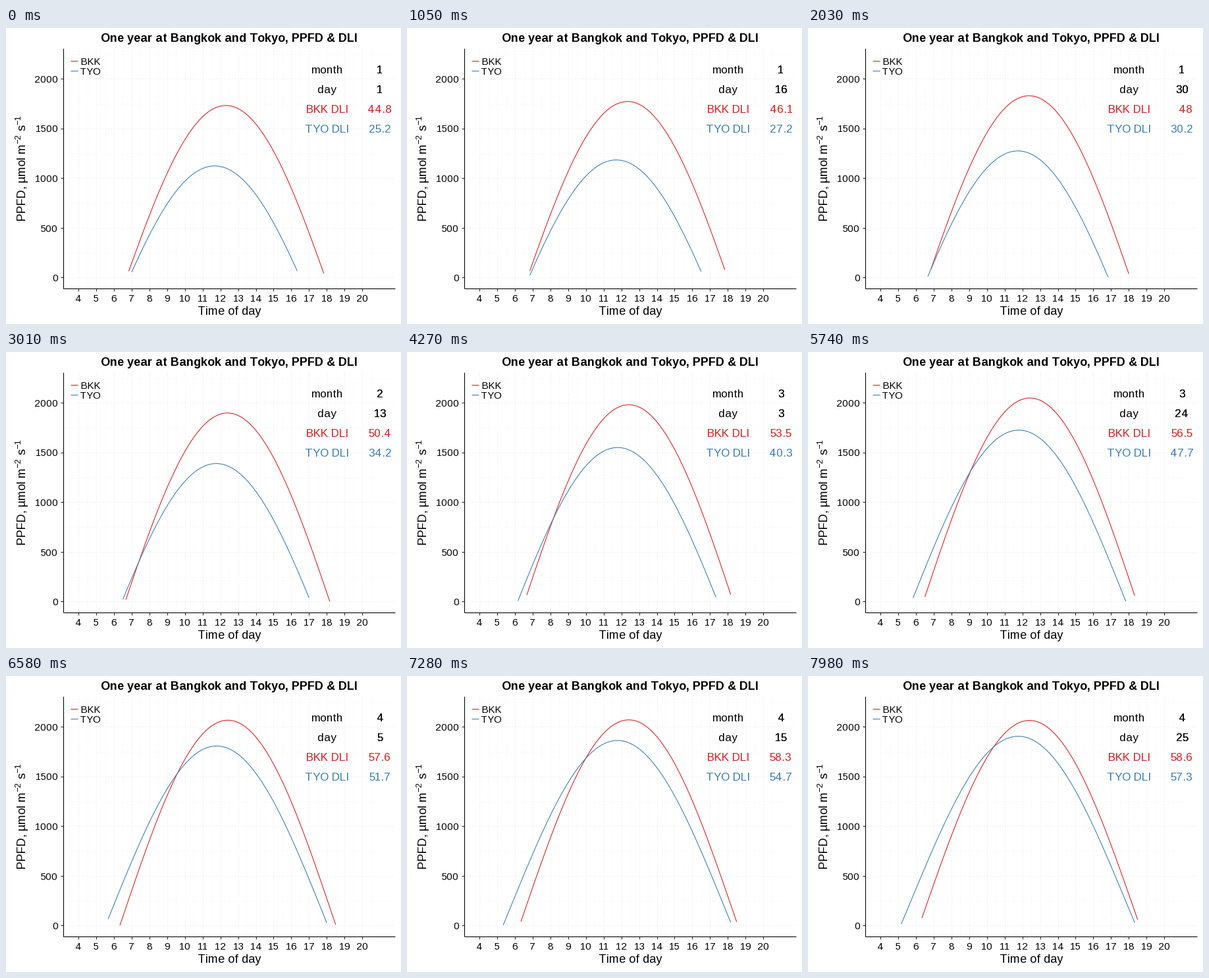
Recreate the animation shown at these times as a matplotlib script. Size 600x450 px, loop 8000 ms.

```python
import numpy as np
import matplotlib.pyplot as plt
from matplotlib.animation import FuncAnimation
from matplotlib.collections import LineCollection

W, H, DPI = 600, 450, 100
PX = 72 / DPI                      # points per pixel
RED, BLUE = "#E41A1C", "#377EB8"
LOOP, STEP, DAY_MS = 8000, 20, 70
MONTHS = (31, 28, 31, 30, 31)
TICK, CELL, TITLE = 15.43, 17.15, 18   # text sizes in pixels

# whole-pixel glyph advances
plt.rcParams.update({
    "font.family": "Liberation Sans",
    "mathtext.default": "regular",
    "text.hinting": "force_autohint",
    "text.hinting_factor": 1,
    "toolbar": "None",
})

# name, colour, latitude, mean solar noon in local hours
CITIES = (("BKK", RED, 13.75, 12.308), ("TYO", BLUE, 35.68, 11.676))
HOURS = np.arange(24 * 6 + 1) / 6


def px_x(hour):
    return 110.2 + 26.93 * (np.asarray(hour) - 4)


def px_y(ppfd):
    return 379.3 - 0.151 * np.asarray(ppfd)


def sun_terms(day, lat):
    """Irradiance scale and the constant and swinging parts of cos(zenith)."""
    n = day + 1
    scale = 2092.4 * (1 + 0.033 * np.cos(2 * np.pi * n / 365))
    dec = np.radians(23.45 * np.sin(2 * np.pi * (n + 284.12) / 365))
    phi = np.radians(lat)
    return scale, np.sin(phi) * np.sin(dec), np.cos(phi) * np.cos(dec)


def curve(day, lat, noon):
    scale, base, swing = sun_terms(day, lat)
    noon = noon + 0.121 * np.cos(np.radians(1.13 * (day - 78.5)))
    ppfd = scale * (base + swing * np.cos(np.radians(15 * (HOURS - noon))))
    up = ppfd > 0
    return px_x(HOURS[up]), px_y(ppfd[up])


def daily_light(day, lat):
    scale, base, swing = sun_terms(day, lat)
    half = np.arccos(-base / swing)
    secs = 86400 / (2 * np.pi)
    return 2 * scale * secs * (base * half + swing * np.sin(half)) / 1e6


def month_day(day):
    for month, length in enumerate(MONTHS, 1):
        if day < length:
            return month, day + 1
        day -= length


fig = plt.figure(figsize=(W / DPI, H / DPI), dpi=DPI, facecolor="white")
ax = fig.add_axes([0, 0, 1, 1])
ax.set_xlim(0, W)
ax.set_ylim(H, 0)
ax.axis("off")


def put(x, y, s, size, ha="center", color="black", **kw):
    return ax.text(x, y, s, fontsize=size * PX, ha=ha, va="baseline",
                   color=color, **kw)


def lines(segs, color, z, style="solid", width=1.07):
    ax.add_collection(LineCollection(segs, colors=color, linewidths=width * PX,
                                     linestyles=style, zorder=z,
                                     capstyle="butt"), autolim=False)


LEFT, RIGHT, TOP, BOTTOM = 87, 591, 31, 396


def grid(hours, levels, color):
    segs = [[(x, BOTTOM), (x, TOP)] for x in px_x(hours)]
    segs += [[(LEFT, y), (RIGHT, y)] for y in px_y(levels)]
    lines(segs, color, 0, (0, (1, 3)), 1)


x_ticks = np.arange(4, 21)
y_ticks = np.arange(0, 2001, 500)
grid(x_ticks + 0.5, y_ticks + 250, "#f2f2f2")
grid(x_ticks, y_ticks, "#e3e3e3")

# axes and ticks
lines([[(LEFT, TOP), (LEFT, BOTTOM)], [(LEFT, BOTTOM), (RIGHT, BOTTOM)]],
      "black", 3)
lines([[(x, BOTTOM), (x, BOTTOM + 4)] for x in px_x(x_ticks)]
      + [[(LEFT - 4, y), (LEFT, y)] for y in px_y(y_ticks)], "#222222", 3)
for h in x_ticks:
    put(px_x(h), 416, str(h), TICK)
for v in y_ticks:
    put(79, px_y(v) + 5.7, str(v), TICK, "right")

put(339.5, 21, "One year at Bangkok and Tokyo, PPFD & DLI", TITLE, weight="bold")
put(339, 436, "Time of day", TITLE)
put(31, 294, "PPFD, µmol m$^{-2}$ s$^{-1}$", TITLE, "left",
    rotation=90, rotation_mode="anchor")

# legend
for (name, color, _, _), y in zip(CITIES, (50.4, 65.2)):
    lines([[(97.5, y), (108.5, y)]], color, 4)
    put(112, y + 5.7, name, TICK, "left")

# read-out table
ROWS = px_y(np.array([2100, 1900, 1700, 1500])) + 6.5
LABELS = ("month", "day", "BKK DLI", "TYO DLI")
INKS = ("black", "black", RED, BLUE)
for y, label, ink in zip(ROWS, LABELS, INKS):
    put(487.5, y, label, CELL, color=ink)
# the black values are overprinted, which makes them look heavier
values = [[put(568, y, "", CELL, color=ink)
           for _ in range(2 if ink == "black" else 1)]
          for y, ink in zip(ROWS, INKS)]

plots = [ax.plot([], [], color=c, lw=1.07 * PX, zorder=5,
                 solid_capstyle="butt")[0] for _, c, _, _ in CITIES]


def draw(i):
    day = (i * STEP + STEP // 2) // DAY_MS
    shown = list(month_day(day))
    for plot, (_, _, lat, noon) in zip(plots, CITIES):
        plot.set_data(*curve(day, lat, noon))
        shown.append(round(float(daily_light(day, lat)), 1))
    for row, (copies, value) in enumerate(zip(values, shown)):
        text = f"{value:g}"
        whole = row > 1 and "." not in text
        for t in copies:
            t.set_text(text)
            t.set_x(568 + (5 if whole else 0))
    return plots


anim = FuncAnimation(fig, draw, frames=LOOP // STEP, interval=STEP,
                     init_func=lambda: draw(0), repeat=True, repeat_delay=0,
                     blit=False)
plt.show()
```
